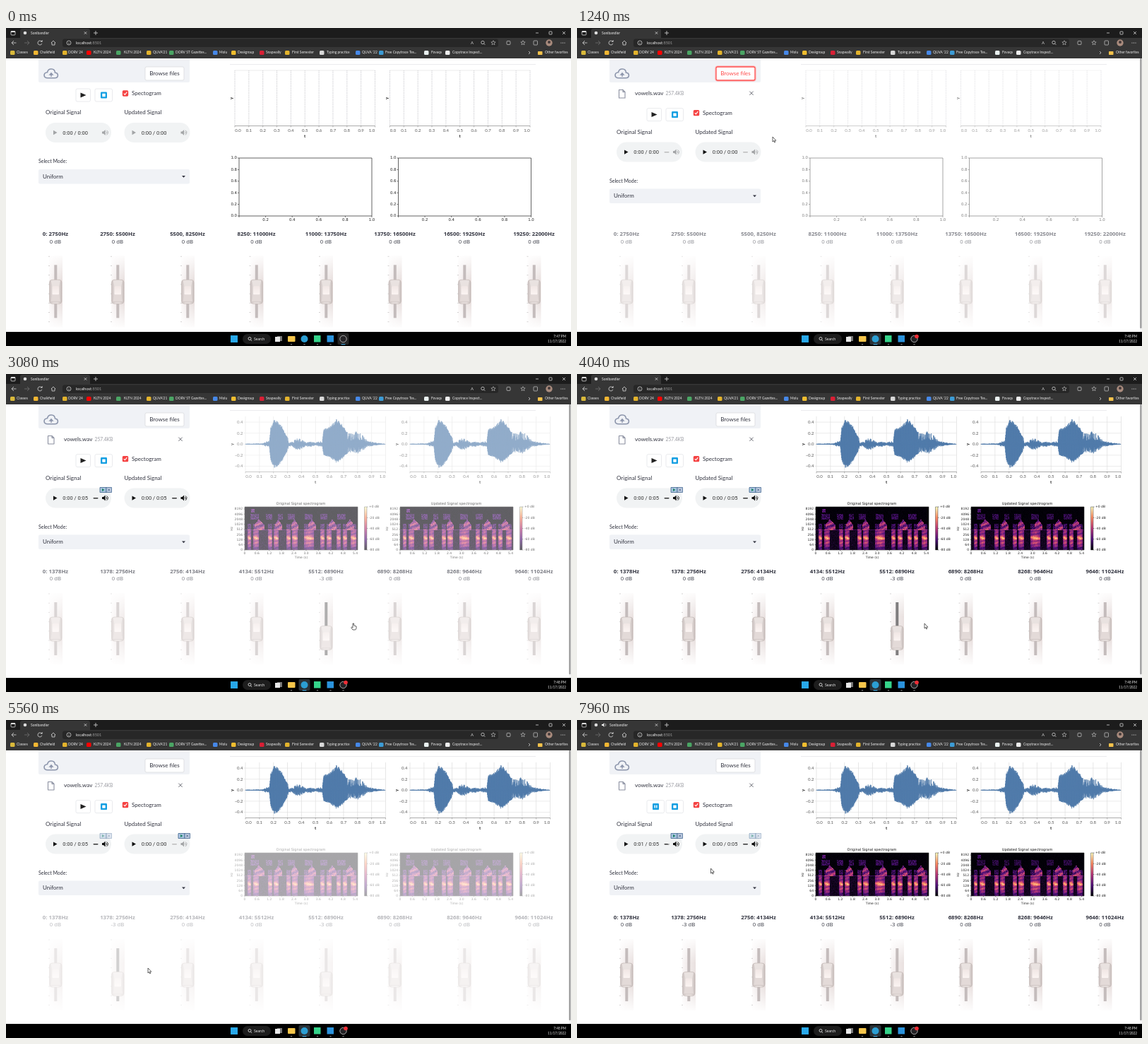
Recreate the animation shown at these times as an HTML page with a canvas. Size 800 px wide and 450 px high, loop 8000 ms.

```html
<!DOCTYPE html>
<html lang="en">
<head>
<meta charset="utf-8">
<title>Equalizer demo</title>
<style>
html, body { margin: 0; width: 100%; height: 100%; overflow: hidden; background: #000; }
canvas { display: block; }
</style>
</head>
<body>
<canvas id="stage" width="800" height="450"></canvas>
<script>
const LOOP = 8000;
const UPLOAD = 840, LOADED = 1720;
const INK = '#31333f', PANEL = '#f0f2f6', RED = '#ff4b4b', BLUE = '#4c78a8';
const SANS = 'Lato, sans-serif', NOTO = '"Noto Sans", sans-serif';
const PLOT = '"DejaVu Sans", sans-serif', UI = 'Roboto, sans-serif';
const c = document.getElementById('stage').getContext('2d');

const clamp = v => Math.max(0, Math.min(1, v));
const mix = (a, b, k) => a + (b - a) * k;

function random(seed) {
  return () => {
    seed = (seed * 1664525 + 1013904223) >>> 0;
    return seed / 4294967296;
  };
}

function track(keys, t) {
  const i = keys.findIndex(k => k[0] > t);
  if (i === 0) return keys[0].slice(1);
  if (i < 0) return keys[keys.length - 1].slice(1);
  const a = keys[i - 1], b = keys[i];
  const u = (t - a[0]) / (b[0] - a[0]), k = u * u * (3 - 2 * u);
  return a.slice(1).map((v, n) => mix(v, b[n + 1], k));
}

// ---- drawing helpers ----
function box(x, y, w, h, fill, r = 0, stroke, width = 0.7) {
  c.beginPath();
  c.roundRect(x, y, w, h, r);
  if (fill) { c.fillStyle = fill; c.fill(); }
  if (stroke) { c.strokeStyle = stroke; c.lineWidth = width; c.stroke(); }
}

function dot(x, y, r, fill, stroke, width = 0.8) {
  box(x - r, y - r, r * 2, r * 2, fill, r, stroke, width);
}

function line(points, color, width = 0.7) {
  c.beginPath();
  for (let i = 0; i < points.length; i += 2) c.lineTo(points[i], points[i + 1]);
  c.strokeStyle = color;
  c.lineWidth = width;
  c.stroke();
}

function poly(points, fill) {
  c.beginPath();
  for (let i = 0; i < points.length; i += 2) c.lineTo(points[i], points[i + 1]);
  c.fillStyle = fill;
  c.fill();
}

function text(s, x, y, size, color = INK, align = 'left', font = SANS, weight = 400) {
  c.font = `${weight} ${size}px ${font}`;
  c.textAlign = align;
  c.textBaseline = 'middle';
  c.fillStyle = color;
  c.fillText(s, x, y);
}

function upright(s, x, y, ...style) {
  c.save();
  c.translate(x, y);
  c.rotate(-Math.PI / 2);
  text(s, 0, 0, ...style);
  c.restore();
}

// ---- browser window ----
const BOOKMARKS = [
  [6, 15, 'Classes', '#d9b93b'], [39, 48, 'Chalkfield', '#f2b632'], [80, 88, 'DORV 24', '#e3b32c'],
  [114, 124, 'KLTN 2024', '#f00'], [156, 167, 'KLTN 2024', '#4aa564'], [199, 208, "QUVA'21", '#e3b32c'],
  [231, 240, 'DORV ST Gazettes...', '#4aa564'], [293, 302, 'Molu', '#4688e8'],
  [319, 328, 'Deskgroup', '#f0bd2f'], [359, 368, 'Snapwally', '#d91f35'],
  [395, 405, 'First Semester', '#e3b32c'], [444, 454, 'Typing practice', '#d8d8d8'],
  [495, 504, "QUVA '22", '#4688e8'], [528, 537, 'Free Copytrace Tes...', '#3c9bd5'],
  [592, 602, 'Fovaqs', '#e9f1f0'], [622, 632, 'Copytrace Inspect...', '#eee']
];

function drawBrowser(t) {
  const white = '#eee', playing = t >= 6600;
  box(0, 0, 800, 15, '#1c1c1c');
  box(0, 14, 800, 29, '#363636');
  box(20, 1, 99, 14, '#363636', [3, 3, 0, 0]);
  box(7, 4.5, 6, 5.5, null, 1, white);
  box(7, 4.5, 6, 1.5, white);
  dot(27, 7, 2.3, '#ddd');
  if (playing) {
    poly([35, 6, 36.5, 6, 38.5, 4, 38.5, 10, 36.5, 8, 35, 8], white);
    line([40, 5, 41, 7, 40, 9], white, 0.6);
  }
  text('Sonibandler', playing ? 46 : 35, 7, 5, white);
  cross(112.5, 7, 1.7, white);
  line([124, 7, 130, 7], white);
  line([127, 4, 127, 10], white);
  line([750, 7, 754, 7], white);
  box(769, 5, 4, 4, null, 0.6, white);
  cross(790, 7, 2, white);

  line([11, 18, 8, 21, 11, 24], white);
  line([8, 21, 14.5, 21], white);
  line([30, 18, 33, 21, 30, 24], '#777');
  line([26, 21, 33, 21], '#777');
  c.beginPath(); c.arc(48, 21, 3, 0.3, 5.6);
  c.strokeStyle = white; c.stroke();
  poly([49, 19.5, 51.5, 19.5, 51.5, 17], white);
  line([64, 21, 67, 18, 70, 21, 69, 21, 69, 24, 65, 24, 65, 21, 64, 21], white);
  box(80, 15.5, 617, 11.5, '#272727', 3);
  dot(89, 21, 3, null, '#ccc');
  line([89, 20.5, 89, 23], '#ccc');
  text('localhost', 99, 21, 5.6, '#f2f2f2');
  const end = 99 + c.measureText('localhost').width;
  text(':8501', end, 21, 5.6, '#999');
  text('A', 660, 21, 6, '#ccc', 'center');
  dot(675, 20.5, 2.2, null, '#ccc');
  line([676.5, 22, 678.5, 24], '#ccc');
  star(690, 21);
  box(709, 18.5, 5, 5, null, 1, '#ccc');
  star(732, 21);
  box(747, 18, 5.5, 6, null, 1, '#ccc');
  dot(769, 21, 4.7, '#a98b7d');
  dot(769, 20, 2, '#443a3a');
  [786, 788.5, 791].forEach(x => dot(x, 21, 0.6, white));

  BOOKMARKS.forEach(([x, label, name, color]) => {
    box(x, 32, 6.5, 6, color, 1.5);
    text(name, label, 35, 4.9, '#eee');
  });
  line([740, 33, 742, 35, 740, 37], white);
  box(753, 33, 6.5, 5, '#f2c14b', 0.7);
  text('Other favorites', 763, 35, 4.9, '#eee');
}

function cross(x, y, r, color) {
  line([x - r, y - r, x + r, y + r], color);
  line([x - r, y + r, x + r, y - r], color);
}

function star(x, y) {
  const pts = [];
  for (let i = 0; i <= 10; i++) {
    const r = i % 2 ? 1.5 : 3.3, a = i * Math.PI / 5 - Math.PI / 2;
    pts.push(x + r * Math.cos(a), y + r * Math.sin(a));
  }
  line(pts, '#ccc', 0.6);
}

function drawTaskbar(t) {
  const focused = t >= 120;
  box(0, 430, 800, 20, '#000');
  box(318, 435, 10, 10, '#28a8ea');
  box(335, 433, 40, 14, '#1d1d1d', 7);
  dot(345, 439.5, 2, null, '#eee');
  line([346.5, 441, 348, 443], '#eee');
  text('Search', 351, 440.3, 5.2, '#eee');
  box(384, 436, 7, 7, '#777');
  box(381, 437, 7, 7, '#e8e8e8');
  if (focused) box(414.5, 432, 16, 16, '#2b3238', 2);
  else box(469.5, 432, 16, 16, '#242424', 2);
  box(399, 436, 10.5, 8, '#f6c64b', 1);
  dot(422.5, 440, 5, '#2c9ed3');
  box(436, 435, 9.5, 9.5, '#35d38a');
  box(454.5, 435, 9.5, 9.5, '#2b93dc');
  dot(477.5, 440, 4.7, '#242326', '#aaa', 1);
  if (focused) dot(481, 436.5, 2.8, '#f02d35');
  [404, 422.5, 441, 459.5, 477.5].forEach((x, i) => {
    const on = i === (focused ? 1 : 4);
    box(x - (on ? 3 : 1.2), 447.3, on ? 6 : 2.4, 1, on ? '#4cc2ff' : '#999', 0.5);
  });
  text(t < UPLOAD ? '7:47 PM' : '7:48 PM', 793, 437, 4.7, '#eee', 'right');
  text('11/17/2022', 793, 443.5, 4.7, '#eee', 'right');
}

// ---- left column ----
function drawControls(t) {
  const uploaded = t >= UPLOAD, focus = t >= 520 && t < 2680;
  const dy = uploaded ? 27.6 : 0;
  box(46, 43, 214, 8, PANEL);
  box(46, 50, 214, 27, PANEL, 2);
  c.beginPath();
  c.moveTo(59, 70.8);
  c.bezierCurveTo(52.5, 70.8, 52.5, 62.7, 58.5, 62.7);
  c.bezierCurveTo(60, 56.2, 69, 56.7, 69.5, 63.2);
  c.bezierCurveTo(74.8, 63.2, 74.8, 70.8, 69, 70.8);
  c.closePath();
  c.strokeStyle = '#8c95ab'; c.lineWidth = 1.6; c.stroke();
  line([64, 69, 64, 64.5], '#8c95ab', 1.4);
  poly([60.5, 66.7, 64, 62.7, 67.5, 66.7], '#8c95ab');
  if (focus) box(195.8, 53.8, 57.4, 21.4, null, 3, '#ffb3b3', 1);
  box(197, 55, 55, 19, '#fff', 2, focus ? RED : '#d6d7dc', focus ? 1.3 : 0.7);
  text('Browse files', 224.5, 64.5, 8, focus ? RED : INK, 'center');

  if (uploaded) {
    line([65, 87.5, 59.5, 87.5, 59.5, 99, 68, 99, 68, 90.5, 65, 87.5, 65, 90.5, 68, 90.5], '#8b90a0', 1.1);
    text('vowels.wav', 82, 92.8, 8);
    text('257.4KB', 125.5, 93, 6.7, '#9a9ba2');
    cross(247, 92.3, 2.7, INK);
    box(797, 43, 3, 387, '#f3f3f3');
    box(797.2, 43, 2.3, 382, '#9b9b9b', 1);
  }

  c.save();
  c.translate(0, dy);
  const paused = t >= 7640;
  box(99, 86, paused ? 24.5 : 20.5, 18, '#fff', 2, '#e0e1e5');
  if (paused) {
    box(107, 90.5, 9, 9, '#139fe2', 1.2);
    box(109.5, 93, 1.4, 4, '#fff');
    box(112.1, 93, 1.4, 4, '#fff');
  } else poly([105.5, 91.5, 113.5, 95, 105.5, 98.5], '#222');
  box(126, 86, 24.5, 18, '#fff', 2, '#e0e1e5');
  box(134, 90.5, 9, 9, '#139fe2', 1.2);
  box(136.3, 92.8, 4.4, 4.4, '#fff', 0.5);
  box(164.8, 88.3, 8.4, 8.4, '#f54343', 1.6);
  line([166.8, 92.6, 168.4, 94.3, 171.3, 90.6], '#fff', 1.1);
  text('Spectogram', 178, 92.5, 8);
  text('Original Signal', 56, 119.5, 8);
  text('Updated Signal', 167.5, 119.5, 8);
  const ready = t >= LOADED;
  const reloading = (t >= 3480 && t < 3640) || (t >= 5440 && t < 5920);
  player(56, t, uploaded, ready, t >= 6640 && t < 7640, t >= 7560 ? '0:01' : '0:00');
  player(167.5, t, uploaded, ready && !reloading, false, '0:00');
  text('Select Mode:', 46, 189.3, 7);
  box(46, 200, 214, 20.5, PANEL, 2);
  text('Uniform', 52, 210.3, 8);
  poly([249, 209, 254, 209, 251.5, 211.7], INK);
  c.restore();
  if (ready) badge(133, t >= 5440 && t < 5920);
  if (t >= 3640) badge(244, t >= 5920);
}

function player(x, t, uploaded, ready, playing, elapsed) {
  const dim = '#a3a5a7', volume = ready ? '#111' : dim;
  box(x, 134, 93, 28, '#f1f3f4', 14);
  if (playing) {
    box(x + 11, 145, 1.8, 6, '#111');
    box(x + 14.3, 145, 1.8, 6, '#111');
  } else poly([x + 11, 144.8, x + 16.5, 148, x + 11, 151.2], uploaded ? '#111' : dim);
  text(`${elapsed} / ${ready ? '0:05' : '0:00'}`, x + 24.3, 148.3, 7.5, '#333', 'left', UI);
  if (uploaded) {
    box(x + 67.5, 147.4, 7, 1.6, ready ? '#333' : '#bbb', 0.8);
    if (elapsed === '0:01') box(x + 72.5, 147.4, 2, 1.6, '#aaa', 0.8);
  }
  const v = x + 80;
  poly([v, 146.5, v + 2, 146.5, v + 4.6, 144, v + 4.6, 152, v + 2, 149.5, v, 149.5], volume);
  c.strokeStyle = volume; c.lineWidth = 0.9;
  [1.8, 3.6].forEach(r => {
    c.beginPath(); c.arc(v + 4.8, 148, r, -1.1, 1.1); c.stroke();
  });
}

function badge(x, faint) {
  c.globalAlpha = faint ? 0.45 : 1;
  box(x, 160.5, 9, 7, '#a9c4df', 0, '#40658e', 0.8);
  poly([x + 3, 162, x + 6.5, 164, x + 3, 166], '#16805f');
  box(x + 9, 160.5, 7.5, 7, '#c2cfe4', 0, '#40658e', 0.8);
  cross(x + 12.7, 164, 1.7, '#26436f');
  c.globalAlpha = 1;
}

// ---- plots ----
const ENVELOPE = [
  [0, .008], [.12, .012], [.14, .045], [.172, .06], [.18, .3], [.205, .44], [.23, .42],
  [.26, .33], [.285, .2], [.303, .12], [.31, .035], [.34, .05], [.36, .1], [.39, .11], [.43, .04],
  [.47, .05], [.5, .025], [.525, .06], [.55, .05], [.56, .27], [.59, .31], [.62, .36], [.65, .45],
  [.68, .4], [.72, .25], [.76, .2], [.8, .24], [.84, .16], [.87, .07], [.92, .035], [1, .005]
];

function envelope(u) {
  const i = Math.max(1, ENVELOPE.findIndex(p => p[0] >= u));
  const a = ENVELOPE[i - 1], b = ENVELOPE[i];
  return mix(a[1], b[1], (u - a[0]) / (b[0] - a[0]));
}

// The signal is dense while voiced and spiky elsewhere.
function makeWave() {
  const rnd = random(31), pts = [];
  for (let i = 0; i <= 900; i++) {
    const u = i / 900, voiced = (u > .17 && u < .3) || (u > .55 && u < .73);
    const size = envelope(u) * mix(voiced ? 0.85 : 0.3, 1, rnd());
    const v = i % 2 ? size : -size * (u > 0.5 ? 0.75 : 0.97);
    pts.push([u * 198, -v * 78]);
  }
  return pts;
}
const WAVE = makeWave();

function vegaAxis(x, loaded) {
  c.setLineDash(loaded ? [] : [1.5, 1]);
  for (let i = 0; i <= 10; i++) line([x + i * 19.85, 60, x + i * 19.85, 138.5], loaded ? '#ddd' : '#bbbbc0', 0.7);
  c.setLineDash([]);
  if (loaded) [.4, .2, 0, -.2, -.4].forEach(v => {
    const y = 99.3 - v * 78;
    line([x - 2, y, x + 198.5, y], '#ddd', 0.6);
    text(v.toFixed(1).replace('-', '−'), x - 3.5, y, 6, '#555', 'right');
  });
  else line([x, 60, x + 198.5, 60], '#ddd', 0.6);
  line([x, 138.5, x + 198.5, 138.5], '#888', 0.7);
  for (let i = 0; i <= 10; i++) {
    const tx = x + i * 19.85, shift = i === 0 ? 4.5 : i === 10 ? -4.5 : 0;
    line([tx, 138.5, tx, 140.5], '#888', 0.6);
    text((i / 10).toFixed(1), tx + shift, 145, 6, '#555', 'center');
  }
  upright('y', x - (loaded ? 18.5 : 4.5), 99.5, 6, '#222', 'center', SANS, 700);
  text('t', x + 99, 152.7, 6, '#222', 'center', SANS, 700);
}

function wavePlot(x) {
  vegaAxis(x, true);
  c.beginPath();
  WAVE.forEach(([px, py]) => c.lineTo(x + px, 99.3 + py));
  c.strokeStyle = BLUE; c.lineWidth = 0.6; c.lineJoin = 'bevel'; c.stroke();
}

function emptyPlot(x) {
  box(x, 184, 188, 82, null, 0, '#222', 0.7);
  for (let i = 0; i <= 5; i++) {
    const y = 266 - i * 16.4, tx = x + i * 37.6, label = (i / 5).toFixed(1);
    line([x - 2, y, x, y], '#222', 0.6);
    line([tx, 266, tx, 268], '#222', 0.6);
    text(label, x - 3, y, 5.4, '#222', 'right', PLOT);
    if (i) text(label, tx, 271.8, 5.4, '#222', 'center', PLOT);
  }
}

const MAGMA = [[0, 0, 4], [81, 18, 124], [183, 55, 121], [252, 137, 97], [252, 253, 191]];
const VOICED = [[4, 8], [12, 19], [33, 38], [41, 47], [59, 64], [67, 74], [84, 97], [107, 112], [116, 122], [130, 135], [139, 144], [150, 157]];
const BURSTS = [[14, 27], [43, 52], [66, 75], [90, 100], [119, 129], [144, 154]];
const HISS = [[8, 19], [30, 38], [47, 53], [61, 70], [85, 95], [107, 116], [131, 142]];

function magma(v) {
  const p = clamp(v) * 3.999, i = Math.floor(p);
  return MAGMA[i].map((a, n) => mix(a, MAGMA[i + 1][n], p - i));
}

function makeSpectrogram(quiet) {
  const cv = document.createElement('canvas');
  cv.width = 160; cv.height = 61;
  const g = cv.getContext('2d'), rnd = random(9);
  const find = (list, x) => {
    const span = list.find(([a, b]) => x >= a && x <= b);
    return span && (x - span[0]) / (span[1] - span[0]);
  };
  for (let x = 0; x < 160; x++) for (let y = 0; y < 61; y++) {
    const n = rnd(), voice = find(VOICED, x), burst = find(BURSTS, x), hiss = find(HISS, x);
    let v = y > 32 ? 0.02 + n * 0.07 : n * 0.02;
    if (y > 31 && voice !== undefined) {
      const edge = 0.72 + 0.28 * Math.sin(voice * Math.PI);
      v = 0.36 + 0.07 * Math.sin((y + voice * 2) * 1.25) + n * 0.12;
      v += 0.48 * Math.exp(-(((y - 43 - voice) / 2.2) ** 2));
      v += 0.12 * Math.exp(-(((y - 50) / 3) ** 2));
      v = (v - (y > 55 ? 0.14 : 0)) * edge;
    } else if (y > 17 + 14 * Math.abs((burst ?? 9) - 0.45) && y <= 32) {
      v = 0.26 + n * 0.24 + 0.14 * Math.sin(y * 0.8 + burst * 4);
    } else if (y > 23 && y <= 32 && voice !== undefined) v = 0.06 + n * 0.2;
    else if (y > 9 && y < 18 && hiss !== undefined) v = 0.05 + n * 0.2;
    if (y > 2 && y < 8 && x > 8 && x < 14) v = 0.12 + n * 0.28;
    if (y === 32) v += 0.16;
    if (y < 18) v *= quiet;
    g.fillStyle = `rgb(${magma(v).map(Math.round)})`;
    g.fillRect(x, y, 1, 1);
  }
  return cv;
}
const SPECTRUM = makeSpectrogram(1), SOFTER = makeSpectrogram(0.88), SOFTEST = makeSpectrogram(0.75);

function spectrumPlot(x, name, picture) {
  const tiny = (s, px, py, align) => text(s, px, py, 4.5, '#222', align, PLOT);
  text(`${name} Signal spectrogram`, x + 79.5, 183.6, 5, '#111', 'center', PLOT);
  c.drawImage(picture, x, 188, 160, 61);
  box(x, 188, 160, 61, null, 0, '#222', 0.6);
  ['8192', '4096', '2048', '1024', '512', '256', '128', '64', '0'].forEach((s, i) => {
    const y = 191 + i * 7.23;
    line([x - 1.5, y, x, y], '#222', 0.5);
    tiny(s, x - 3, y + 0.2, 'right');
  });
  for (let i = 0; i < 10; i++) {
    const tx = x + i * 17.4;
    line([tx, 249, tx, 250.5], '#222', 0.5);
    tiny(i ? (i * 0.6).toFixed(1) : '0', tx, 254.2, 'center');
  }
  tiny('Time (s)', x + 80, 260, 'center');
  upright('Hz', x - 18, 219, 4.5, '#222', 'center', PLOT);
  const bar = c.createLinearGradient(0, 249, 0, 188);
  MAGMA.forEach((rgb, i) => bar.addColorStop(i / 4, `rgb(${rgb})`));
  box(x + 169.5, 188, 3.5, 61, bar, 0, '#222', 0.4);
  ['+0', '-20', '-40', '-60', '-80'].forEach((s, i) => {
    const y = 188 + i * 15.25;
    line([x + 173, y, x + 174.5, y], '#222', 0.5);
    tiny(`${s} dB`, x + 176, y + 0.2, 'left');
  });
}

// ---- sliders ----
const CENTERS = [70, 158, 257, 354.5, 453, 550.5, 649, 747.5];
const EMPTY_BANDS = ['0: 2750Hz', '2750: 5500Hz', '5500, 8250Hz', '8250: 11000Hz',
  '11000: 13750Hz', '13750: 16500Hz', '16500: 19250Hz', '19250: 22000Hz'];
const BANDS = CENTERS.map((_, i) => `${i * 1378}: ${(i + 1) * 1378}Hz`);

function gradient(x0, y0, x1, y1, ...colors) {
  const g = c.createLinearGradient(x0, y0, x1, y1);
  colors.forEach((color, i) => g.addColorStop(i / (colors.length - 1), color));
  return g;
}

function drawSlider(x, top, drop, active) {
  box(x - 9, top, 19, 101, gradient(x - 9, 0, x + 10, 0, '#fbf8f8', '#f3eded', '#eee7e6', '#e9e0df'));
  const haze = 'rgba(255,255,255,0.9)', clear = 'rgba(255,255,255,0)';
  box(x - 10, top - 1, 21, 103, gradient(0, top, 0, top + 101, haze, clear, clear, haze));
  for (let i = 0; i < 8; i++) line([x - 10, top + 1 + i * 13.2, x - 8, top + 1 + i * 13.2], '#b8b4b4', 0.6);
  box(x - 1.7, top + 13, 4, 75, active ? '#7f7d7e' : '#c4bcbc');

  // The cap: a sloped top, a bright raised centre and a flared foot.
  const y = top + 34 + drop, l = x - 8.5, r = x + 9;
  box(l, y, r - l, 34, gradient(l, 0, r, 0, '#cbc1c0', '#eae3e1', '#ece5e3', '#c8bebc'), 4, '#bfb5b3', 0.6);
  poly([l + 2, y + 1, r - 2, y + 1, x + 5, y + 9, x - 4.5, y + 9], '#e9e2e0');
  box(x - 4.5, y + 9, 9.5, 12, gradient(0, y + 9, 0, y + 21, '#f1e7e5', '#fbf4f2'), 1);
  poly([x - 4.5, y + 21, x + 5, y + 21, r - 2, y + 31, l + 2, y + 31], '#e3dad8');
  line([l + 2, y + 31.5, r - 2, y + 31.5], '#cfc5c3', 1);
}

function drawSliders(t) {
  const loaded = t >= LOADED, dy = loaded ? 0 : 12.3;
  const drops = { 4: clamp((t - 2640) / 120), 1: clamp((t - 4840) / 120) };
  CENTERS.forEach((x, i) => {
    const k = drops[i] || 0;
    const active = (i === 4 && k > 0 && t < 4800) || (i === 1 && k > 0 && t < 6000);
    text((loaded ? BANDS : EMPTY_BANDS)[i], x, 279.6 + dy, 7.8, INK, 'center', NOTO, 600);
    text(`${k ? -Math.round(k * 3) : 0} dB`, x, 290.2 + dy, 7.8, '#444650', 'center', NOTO);
    drawSlider(x, 310 + dy, k * 12.5, active);
  });
}

// ---- fading of outdated parts ----
const FADES = [[880, LOADED, LOADED], [2760, 3640, 3640], [5000, 5480, 5920]];

function veil(t, column, x, y, w, h) {
  FADES.forEach(f => {
    if (t >= f[0] && t < f[column]) box(x, y, w, h, `rgba(255,255,255,${0.67 * clamp((t - f[0]) / 580)})`);
  });
}

function drawPage(t) {
  box(0, 43, 800, 387, '#fff');
  line([317, 51.5, 750, 51.5], '#e6e6ea', 0.8);
  if (t < LOADED) {
    [324, 543.5].forEach(x => vegaAxis(x, false));
    [330, 555.5].forEach(emptyPlot);
  } else {
    [339, 572].forEach(wavePlot);
    spectrumPlot(338, 'Original', SPECTRUM);
    spectrumPlot(558, 'Updated', t < 3640 ? SPECTRUM : t < 5920 ? SOFTER : SOFTEST);
    if (t >= 1900 && t < 2520) {
      line([762, 185, 762, 182.5, 764.5, 182.5], '#444', 0.9);
      line([769, 186.5, 769, 189, 766.5, 189], '#444', 0.9);
      line([762, 182.5, 769, 189], '#444', 0.9);
    }
  }
  drawSliders(t);
  veil(t, 1, 312, 53, 484, 105);
  veil(t, 2, 312, 178, 484, 252);
  veil(t, 2, 40, 270, 272, 160);
  drawControls(t);
}

// ---- pointer ----
const POINTER = [
  [120, 424, 440], [480, 226, 66], [860, 226, 66], [1240, 277, 154], [1600, 277, 154], [2240, 314, 231],
  [2600, 453, 360], [2760, 453, 373], [3080, 492, 353], [4240, 492, 353], [4800, 158, 361],
  [4960, 158, 373], [5300, 201, 351], [5920, 201, 351], [6560, 70, 177], [7560, 70, 177], [7920, 189.5, 210]
];

function drawPointer(t) {
  if (t < 120) return;
  const [x, y] = track(POINTER, t);
  const hand = (t > 2560 && t < 3360) || (t > 4700 && t < 5080);
  c.save();
  c.translate(x, y);
  c.beginPath();
  const shape = hand
    ? [-1, 0, 0.5, 0, 0.7, 3, 4, 4, 4, 7, 2.8, 9, -1, 9, -3.3, 5.8, -2.3, 5, -1, 6]
    : [0, 0, 0, 7, 1.6, 5.6, 2.7, 8, 3.7, 7.5, 2.7, 5.2, 4.8, 5.2];
  for (let i = 0; i < shape.length; i += 2) c.lineTo(shape[i], shape[i + 1]);
  c.closePath();
  c.fillStyle = '#fff'; c.fill();
  c.strokeStyle = '#222'; c.lineWidth = 0.7; c.stroke();
  c.restore();
}

function frame() {
  const t = performance.now() % LOOP;
  drawPage(t);
  drawBrowser(t);
  drawTaskbar(t);
  drawPointer(t);
  requestAnimationFrame(frame);
}
frame();
</script>
</body>
</html>
```
